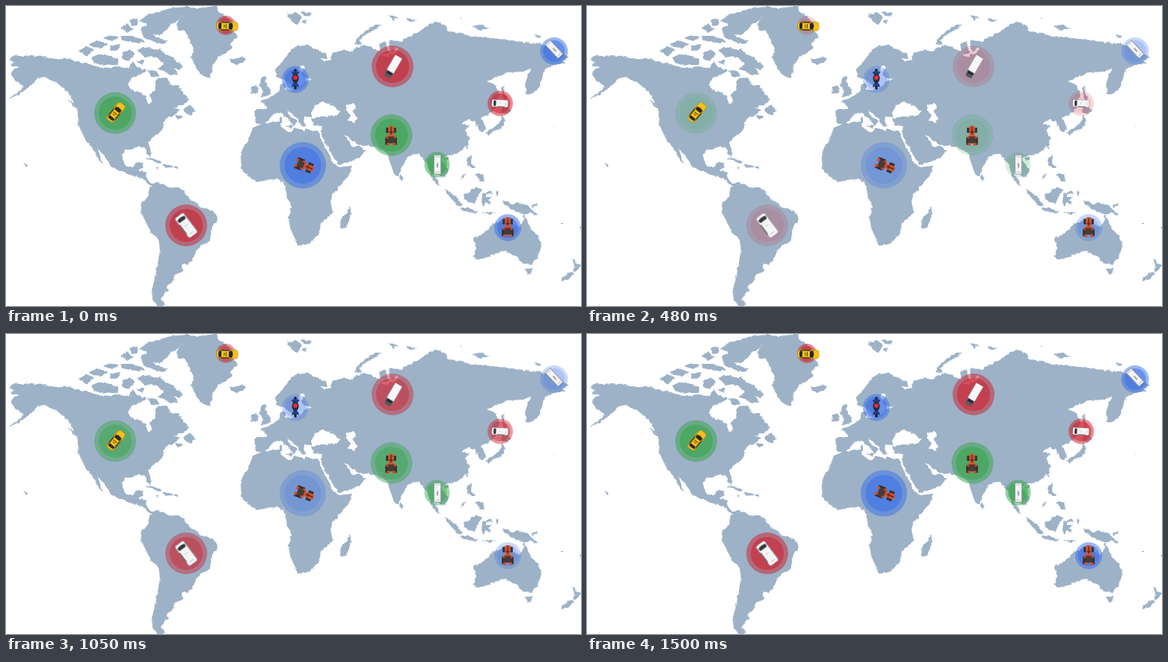
These frames come from a looping animation (769 px wide and 402 px high, 1530 ms). An HTML page:

```html
<!DOCTYPE html>
<html lang="en">
<head>
<meta charset="utf-8">
<title>Fleet map</title>
<style>
html, body { margin: 0; width: 100%; height: 100%; overflow: hidden; background: #fff; }
svg { display: block; width: 769px; height: 402px; }
.land { fill: #9db2c7; }
.sea { fill: #fff; }
.gulf { fill: none; stroke: #fff; stroke-width: 3; stroke-linecap: round; }
.red { fill: #cc202d; }
.green { fill: #35a548; }
.blue { fill: #3a70e8; }
.red, .green { animation: pulse 1530ms infinite cubic-bezier(.4, .05, .6, .95); }
.blue { animation: slow 1530ms infinite cubic-bezier(.4, .05, .6, .95); }
@keyframes pulse { 0%, 80%, 100% { opacity: 1; } 40% { opacity: .23; } }
@keyframes slow { 0%, 100% { opacity: 1; } 51% { opacity: .33; } }
</style>
</head>
<body>
<svg viewBox="0 0 769 402">
<defs>
  <filter id="coast" filterUnits="userSpaceOnUse" x="0" y="0" width="769" height="402" color-interpolation-filters="sRGB">
    <feTurbulence type="fractalNoise" baseFrequency=".2" numOctaves="2" seed="4"/>
    <feDisplacementMap in="SourceGraphic" scale="4" xChannelSelector="R" yChannelSelector="G"/>
  </filter>
  <g id="taxi">
    <rect x="-6.3" y="-14.5" width="12.6" height="29" rx="4.3" fill="#c98f10"/>
    <rect x="-5.3" y="-14" width="10.6" height="28" rx="3.8" fill="#f8c01c"/>
    <path d="M-5-6Q0-9 5-6L4-2H-4ZM-4 8H4L5 11Q0 13-5 11Z" fill="#26282b"/>
    <path d="M-5.8-4L-4.3-1V7L-5.8 10ZM5.8-4L4.3-1V7L5.8 10Z" fill="#2c2a26"/>
    <path d="M-3 1.5H3M-2 4H2" stroke="#4b3a10"/>
  </g>
  <g id="van">
    <rect x="-6.8" y="-15" width="13.6" height="30" rx="2.6" fill="#a3a7ad"/>
    <rect x="-6" y="-14.5" width="12" height="29" rx="2" fill="#f5f5f6"/>
    <path d="M-5.6-10.5Q0-13 5.6-10.5L4.6-7H-4.6Z" fill="#35393f"/>
    <path d="M-6-5V9" stroke="#4b5057" stroke-width="1.1"/>
    <path d="M-2 0H2M-3 11H3" stroke="#c8cbd0"/>
  </g>
  <g id="bus">
    <rect x="-5" y="-13" width="10" height="26" rx="1" fill="#92969c"/>
    <rect x="-4.1" y="-12.3" width="8.2" height="24.6" fill="#f3f3f4"/>
    <path d="M-3.5-10.5H3.5M-3 10H3" stroke="#c2c5ca"/>
    <path d="M0-2V4" stroke="#8d9299" stroke-width="1.6"/>
  </g>
  <g id="truck">
    <rect x="-5" y="-17" width="10" height="11" rx="2.5" fill="#54585f"/>
    <path d="M-4-12H4V-9H-4Z" fill="#24272b"/>
    <rect x="-6" y="-8" width="12" height="25" rx=".8" fill="#b4b7bc"/>
    <rect x="-5.2" y="-7.5" width="10.4" height="24" fill="#f8f8f8"/>
  </g>
  <g id="tractor">
    <path d="M-6.8-11H-3.5V-4H-6.8ZM3.5-11H6.8V-4H3.5ZM-7.8 2H-4V12H-7.8ZM4 2H7.8V12H4Z" fill="#35302e"/>
    <path d="M-5-7.5H5M-5 7H5" stroke="#5b3b31" stroke-width="2"/>
    <rect x="-3.4" y="-13.5" width="6.8" height="15" rx="1.8" fill="#d4532f"/>
    <path d="M-6.4 0H6.4V4H-6.4Z" fill="#c8472a"/>
    <rect x="-4" y="1" width="8" height="9" rx="1" fill="#453c37"/>
    <path d="M-6 9.5H-2V13H-6ZM2 9.5H6V13H2Z" fill="#d24c2c"/>
    <path d="M0-12V-2M-2.5-5H2.5" stroke="#59281e" stroke-width="1.4"/>
  </g>
  <g id="bike">
    <rect x="-1.7" y="-14" width="3.4" height="28" rx="1.7" fill="#202329"/>
    <path d="M-5.5-9Q0-13 5.5-9L3-6H-3ZM-4 7L0 3L4 7L5 11L0 9L-5 11Z" fill="#263c86"/>
    <ellipse cy="-1" rx="4.5" ry="6.5" fill="#292b33"/>
    <circle cy="-2" r="3" fill="#e3283c"/>
  </g>
</defs>

<g class="land" filter="url(#coast)">
  <!-- North America -->
  <path d="M4 72L10 66L20 67L34 66L50 68L66 72L82 70L94 74L108 77L122 81L136 83L150 81L163 84L170 74L175 82L188 86L180 92L168 97L163 105L168 113L178 115L186 120L190 131L195 128L193 119L199 112L201 100L205 95L214 97L221 106L230 106L236 115L245 125L238 132L224 136L232 139L226 147L217 149L211 154L211 162L206 169L196 176L190 183L194 196L193 203L188 198L186 190L178 188L170 191L160 192L155 199L157 210L162 216L170 216L174 210L184 209L182 217L177 220L187 223L188 232L196 238L207 236L204 241L194 241L184 233L174 228L164 226L150 220L140 214L131 200L122 190L130 212L125 207L115 189L107 180L101 169L96 157L97 143L91 130L84 118L73 107L61 98L50 95"/>
  <path d="M50 95L41 98L33 107L18 118L1 126L14 117L24 108L12 100L7 92L9 85L18 82L5 79L15 75L4 72L70 71V104Z"/>
  <path d="M84 126L91 131L96 138L89 134ZM238 138L246 133L253 140L248 146L240 143ZM226 148L234 145L237 149L229 152Z"/>
  <!-- Arctic islands -->
  <path d="M97 60L108 54L117 59L108 68ZM114 69L125 64L140 68L151 72L149 79L133 79L119 78ZM111 51L123 46L137 51L128 56L116 55ZM139 53L153 51L150 59L140 60ZM129 43L141 39L151 43L143 47ZM153 40L166 40L181 44L186 49L171 49L155 46Z"/>
  <path d="M155 63L165 58L173 65L164 74L155 70ZM175 58L187 55L197 58L207 58L213 65L223 68L229 75L237 81L231 86L225 82L230 92L218 92L211 87L202 84L211 78L205 71L195 68L185 68ZM190 86L200 88L206 94L195 96ZM175 73L185 73L182 80Z"/>
  <path d="M180 31L189 24L178 20L188 13L202 8L219 3L241 1L256 3L246 9L235 13L229 20L219 25L216 31L208 38L196 39L205 43L216 47L210 51L193 47L184 42ZM152 29L162 24L170 31L162 36ZM165 19L177 17L176 26L168 27Z"/>
  <!-- Greenland, Iceland, Svalbard -->
  <path d="M228 25L234 14L246 6L264 2L282 0L284 8L294 13L299 20L302 30L310 42L303 46L300 50L303 56L294 63L283 69L277 80L273 97L262 93L254 83L248 69L251 57L246 46L240 34L230 32Z"/>
  <path d="M299 70L306 72L312 68L321 70L318 76L307 79L301 76ZM375 11L389 9L396 15L390 25L382 20ZM394 8L409 9L406 14L397 13ZM395 21L402 18L401 24Z"/>
  <!-- Caribbean -->
  <path d="M186 204L196 204L209 210L204 211L195 207ZM210 212L219 212L223 216L212 217ZM200 215L205 215L203 218ZM225 215H229V218H225ZM22 209L29 213L27 215Z"/>
  <!-- South America -->
  <path d="M192 243L200 240L211 238L216 243L227 242L238 248L245 258L255 264L260 270L271 272L281 279L283 286L276 296L274 307L270 317L260 321L254 329L250 339L243 346L235 347L236 356L226 360L222 370L216 374L217 381L211 386L207 394L214 401L204 402L196 394L195 380L199 365L203 345L206 327L204 312L194 304L187 289L180 276L182 264L190 256Z"/>
  <!-- Africa, Madagascar -->
  <path d="M330 163L342 158L355 156L366 155L369 163L380 169L386 163L400 167L417 167L421 178L429 193L436 208L445 216L463 214L458 228L447 241L437 252L434 262L437 276L428 286L421 291L419 304L409 315L401 320L390 321L386 311L380 297L378 282L382 268L376 257L374 245L371 236L362 232L350 233L336 236L324 229L315 218L314 204L316 191L324 180ZM460 268L462 278L455 297L448 298L447 286L454 279Z"/>
  <!-- Europe -->
  <path d="M332 141L336 138L349 138L346 131L340 127L350 124L359 119L367 113L367 104L373 104L373 112L383 113L394 109L399 101L410 98L399 96L395 90L400 82L394 80L389 91L390 99L383 108L376 101L370 97L362 96L360 85L370 74L379 61L389 54L402 51L412 57L428 64L430 71L420 70L426 75L434 71L437 62L450 60L455 130L444 135L438 127L430 131L424 127L414 133L408 143L409 149L399 148L398 155L402 160L396 162L391 153L385 146L376 140L380 148L390 154L385 161L377 151L368 143L357 145L350 154L344 159L334 157Z"/>
  <path d="M342 95L348 94L346 101L352 110L355 117L348 121L339 122L344 114L339 105ZM329 108L336 106L337 115L328 118ZM366 150L369 149V157L366 157ZM374 160L383 160L381 164ZM399 165L407 165V167H400ZM421 164L427 162L424 166Z"/>
  <!-- Northern Asia -->
  <path d="M440 62L453 59L463 62L466 56L480 53L490 55L501 62L499 51L509 46L528 47L539 41L554 34L564 25L574 21L588 26L592 34L607 36L622 41L640 42L658 44L676 46L693 49L712 50L727 55L742 62L752 69L744 73L748 78L735 78L720 85L717 96L713 109L705 116L696 119L694 105L698 94L702 84L689 88L670 89L656 95L643 101L654 106L660 119L656 132L646 145L628 151H430Z"/>
  <!-- Southern Asia -->
  <path d="M408 151L421 148L434 148L445 150L440 132H660L646 144L635 150L642 163L637 169L631 164L628 156L618 152L609 157L620 160L614 166L620 177L617 187L606 196L592 201L581 203L585 211L591 219L589 227L582 230L577 224L573 218L571 225L576 231L580 242L575 238L567 226L565 214L558 206L552 198L543 199L532 209L528 218L525 228L520 227L514 211L510 198L504 194L495 189L481 187L471 186L459 177L452 172L458 181L464 189L472 187L481 193L474 202L459 209L444 213L437 201L430 189L423 176L421 168L423 161L411 160Z"/>
  <path d="M527 225L531 230L529 235L526 231ZM586 203H592V206L587 207ZM615 187L619 184L617 193Z"/>
  <!-- Islands of the north and east -->
  <path d="M466 50L470 42L480 34L494 25L503 25L492 32L480 39L473 46L476 52ZM512 12L525 15L518 19ZM536 16L550 19L540 22ZM624 27L635 25L646 30L634 33ZM708 39L716 40L711 43Z"/>
  <path d="M662 109L666 108L668 121L671 130L666 129ZM663 135L670 136L676 140L670 145L662 142ZM664 146L668 154L663 164L652 167L646 174L641 170L650 164L659 158Z"/>
  <path d="M617 203L623 201L622 211L628 217L623 217L617 212ZM628 225L638 225L640 235L634 235ZM606 233L615 224L613 229Z"/>
  <path d="M586 245L594 249L603 257L610 266L607 269L597 261ZM608 270L619 271L632 276L627 278L610 274ZM612 251L620 250L628 242L637 246L631 255L627 264L617 263L613 258ZM637 251L649 248L650 251L642 252L643 256L650 256L645 260L648 267L642 263L639 269L636 263ZM636 276L648 276L657 277L646 279ZM655 249L659 247L657 257Z"/>
  <path d="M664 261L672 262L676 267L684 263L697 267L706 275L712 281L702 278L693 279L684 276L675 271L666 266ZM702 267L710 264L711 267L704 270Z"/>
  <!-- Oceania -->
  <path d="M625 312L636 306L644 300L651 292L659 290L665 285L676 284L677 291L686 296L691 290L693 279L697 287L702 299L711 307L716 321L711 337L702 347L691 345L684 337L678 333L667 328L653 332L643 337L630 340L625 335L629 326ZM695 351L704 351L701 360L696 358Z"/>
  <path d="M757 336L763 345L769 348L764 354L758 357L760 349ZM756 355L760 359L752 366L744 369L743 365Z"/>
  <!-- Inland seas -->
  <path class="sea" d="M412 145L414 134L424 131L430 134L438 133L447 143L439 147L425 145L417 149ZM455 133L464 130L468 136L463 141L470 150L466 157L458 153L460 146L454 139ZM224 91L232 94L234 101L224 100Z"/>
  <path class="gulf" d="M510 46Q509 54 514 61Q519 66 522 57M514 62Q510 68 503 66"/>
</g>
<path d="M743 291h1v1h-1zM768 296h1v1h-1z" fill="#24292e"/>
<path d="M732 161h1v1h-1zM607 16h2v1h-2z" fill="#9db2c7"/>

<g id="spots"></g>
<g id="fleet"></g>
</svg>
<script>
const spots = [
  ['green', 146, 143.5, 28], ['red', 241, 294, 28], ['red', 517, 81, 28],
  ['green', 515.5, 173, 28], ['blue', 397, 213.5, 31], ['blue', 387, 98.5, 18],
  ['blue', 733, 60.5, 18.5], ['red', 661, 130.5, 17], ['green', 576.5, 212.5, 17],
  ['blue', 671, 297, 18], ['red', 294, 26, 13]
];
const fleet = [
  ['taxi', 147, 142.5, 39], ['taxi', 296, 27, 92], ['van', 241, 294, -37, 1.1],
  ['truck', 517.5, 81.5, 210, .93], ['tractor', 515, 174, 0], ['tractor', 399, 214, 112],
  ['bike', 387, 98, 0], ['bus', 733, 58, -43], ['van', 660.5, 130.5, -87, .73],
  ['bus', 577, 212.5, 0], ['tractor', 671, 296.5, 0]
];
const disc = (x, y, r, a) => `<circle cx="${x}" cy="${y}" r="${r}" fill-opacity="${a}"/>`;
document.getElementById('spots').innerHTML = spots.map(([hue, x, y, r]) =>
  `<g class="${hue}">${disc(x, y, r, .51)}${disc(x, y, r * .79, .55)}</g>`).join('');
document.getElementById('fleet').innerHTML = fleet.map(([kind, x, y, turn, size = 1]) =>
  `<use href="#${kind}" transform="translate(${x} ${y}) rotate(${turn}) scale(${size})"/>`).join('');
</script>
</body>
</html>
```
